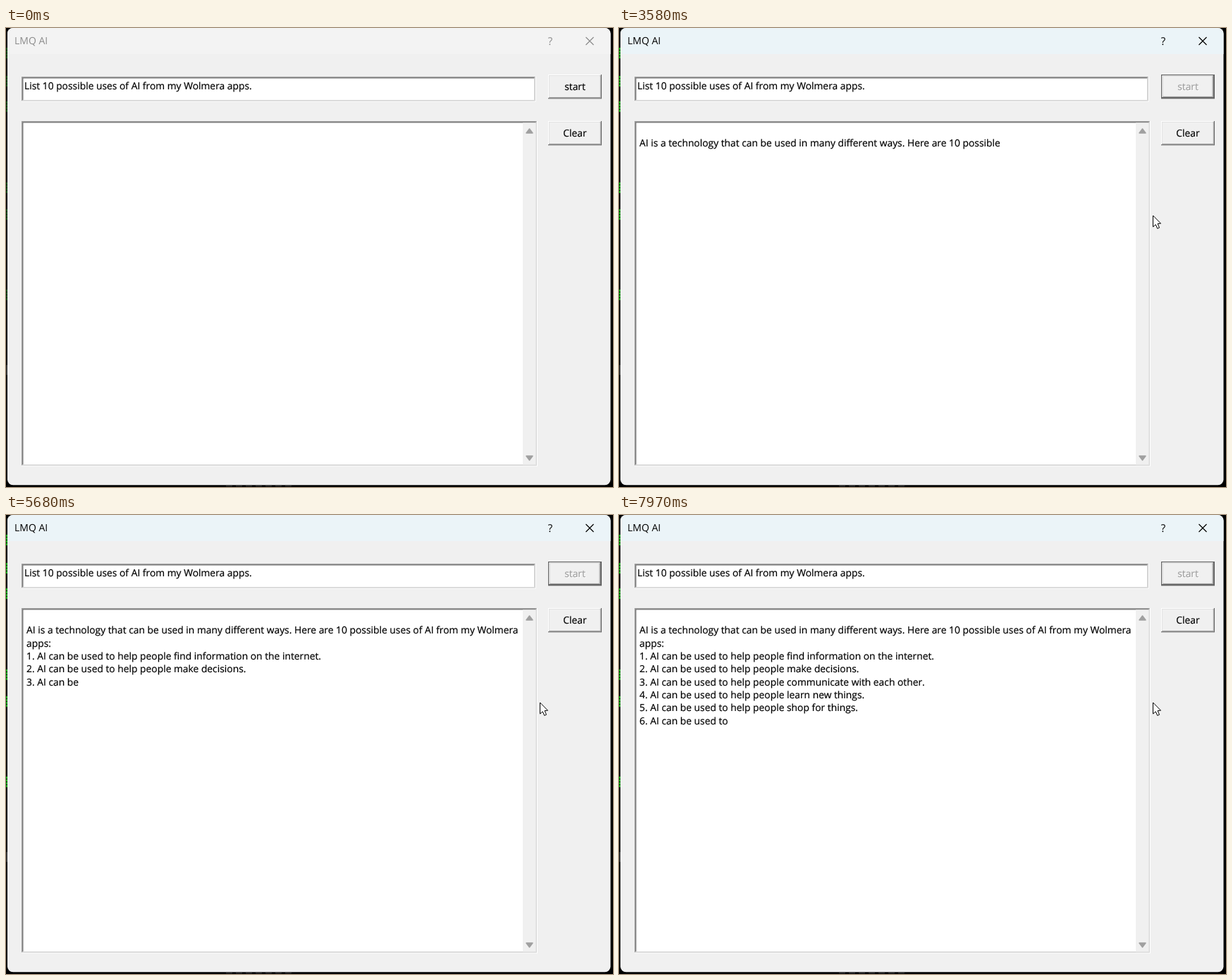
An HTML page with a canvas that plays this animation: 861x651 px, repeating every 8 s.

```html
<!DOCTYPE html>
<html lang="en">
<head>
<meta charset="utf-8">
<title>AI dialog</title>
<style>
  html, body { margin: 0; width: 100%; height: 100%; overflow: hidden; background: #000; }
  canvas { display: block; }
</style>
</head>
<body>
<canvas id="stage" width="861" height="651"></canvas>
<script>
const ctx = document.getElementById('stage').getContext('2d');
const LOOP = 8000, TICK = 78.1;
const EDGE = 1.23; // dialog pixels are shown enlarged, so edges are slightly soft
const PROMPT = 'List 10 possible uses of AI from my Wolmera apps.';
const USES = ['find information on the internet', 'make decisions', 'communicate with each other',
  'learn new things', 'shop for things', ''];
const ANSWER = 'AI is a technology that can be used in many different ways. ' +
  'Here are 10 possible uses of AI from my Wolmera\napps:' +
  USES.map((use, i) => `\n${i + 1}. AI can be used to` + (use && ` help people ${use}.`)).join('');
const TOKENS = ANSWER.match(/\napps|\n| ?\w+|[.:]/g);
// [tick, words written so far]
const PACE = [[33, 1], [43, 17], [54, 35], [70, 60], [89, 90], [99, 105]];

function rect(x, y, w, h, color) {
  ctx.fillStyle = color;
  ctx.fillRect(x, y, w, h);
}

function text(str, x, y, color = '#000', size = 13.83, align = 'left', weight = 0.2) {
  ctx.font = `${size}px "Open Sans", "Noto Sans", sans-serif`;
  ctx.textAlign = align;
  ctx.fillStyle = ctx.strokeStyle = color;
  ctx.fillText(str, x, y);
  if (weight) {
    ctx.lineWidth = weight;
    ctx.strokeText(str, x, y);
  }
}

function polygon(points, fill, stroke, width = 1) {
  ctx.beginPath();
  points.forEach(([x, y]) => ctx.lineTo(x, y));
  ctx.closePath();
  ctx.fillStyle = fill;
  ctx.fill();
  ctx.lineJoin = 'round';
  ctx.lineWidth = width;
  ctx.strokeStyle = stroke;
  ctx.stroke();
}

// Nested edges: each layer paints its bottom-right colour, then its top-left colour.
function bevel(x, y, w, h, layers, fill) {
  for (const [topLeft, bottomRight] of layers) {
    rect(x, y, w, h, bottomRight);
    rect(x, y, w - EDGE, h - EDGE, topLeft);
    x += EDGE; y += EDGE; w -= 2 * EDGE; h -= 2 * EDGE;
  }
  rect(x, y, w, h, fill);
}

const sunken = (x, y, w, h) =>
  bevel(x, y, w, h, [['#a0a0a0', '#fff'], ['#696969', '#e3e3e3']], '#fff');

function button(label, y, state) {
  const raised = [['#fff', '#696969'], ['#f0f0f0', '#a0a0a0']];
  const frame = ['#646464', '#646464'];
  const layers = {
    normal: raised,
    pressed: [frame, ['#a0a0a0', '#a0a0a0']],
    disabled: [frame, ...raised]
  }[state];
  bevel(769, y, 76, 34.4, layers, '#f0f0f0');
  if (state === 'pressed') {
    ctx.setLineDash([1, 1]);
    ctx.lineWidth = 1;
    ctx.strokeStyle = '#000';
    ctx.strokeRect(774.5, y + 5.5, 65, 24);
    ctx.setLineDash([]);
  }
  const baseline = y + 22 + (state === 'pressed');
  if (state === 'disabled') text(label, 808, baseline + 1, '#fff', 13.83, 'center');
  text(label, 807, baseline, state === 'disabled' ? '#a0a0a0' : '#000', 13.83, 'center');
}

function backdrop(bright) {
  rect(0, 0, 861, 651, '#000');
  const green = bright ? '#12a812' : '#0b4a0b';
  for (const y of [28, 68, 104, 219, 257, 371])
    for (let i = 0; i < 4; i++) rect(0, y + i * 4, 2, 3, green);
  rect(0, 478, 2, 14, '#333');
  for (let x = 312; x < 408; x += 14) rect(x, 649, 9, 1, '#3a3a3a');
}

function titleBar(tick) {
  const color = tick < 14 ? '#8c8c8c' : '#000';
  rect(2, 0, 856, 37, tick < 14 ? '#f3f3f3' : tick < 15 ? '#f2f4f4' : '#ebf4f8');
  text('LMQ AI', 12, 23, color, 14, 'left', 0);
  text('?', 772, 23.5, color, 15, 'center', 0);
  ctx.beginPath();
  ctx.moveTo(822.5, 13); ctx.lineTo(833.5, 24);
  ctx.moveTo(833.5, 13); ctx.lineTo(822.5, 24);
  ctx.lineWidth = 1.2;
  ctx.strokeStyle = color;
  ctx.stroke();
}

function scrollArrow(y, dir) {
  polygon([[738, y + 3 * dir], [747, y + 3 * dir], [742.5, y - 3 * dir]], '#a0a0a0', '#a0a0a0', 1.5);
}

function answer(tick) {
  if (tick < PACE[0][0]) return;
  const i = Math.max(1, PACE.findIndex(([at]) => at >= tick));
  const [[t0, n0], [t1, n1]] = [PACE[i - 1], PACE[i]];
  const count = Math.floor(n0 + (n1 - n0) * (tick - t0) / (t1 - t0) + 1e-6);
  TOKENS.slice(0, count).join('').split('\n').forEach((line, row) =>
    text(line, 29, Math.round(168.3 + 18.35 * row)));
}

function pointerAt(tick) {
  const mix = (x0, y0, x1, y1, p) => [x0 + (x1 - x0) * p, y0 + (y1 - y0) * p];
  if (tick <= 10) return mix(768, 548, 792, 85, 1 - (1 - tick / 10) ** 2);
  if (tick <= 16) return mix(792, 85, 797, 84, Math.min(1, (tick - 10) / 2));
  const p = Math.min(1, (tick - 16) / 6);
  return mix(797, 84, 757.5, 266, p * (2 - p));
}

function pointer(tick) {
  if (tick < 0) return;
  const [x, y] = pointerAt(tick);
  const clicking = tick === 14;
  if (clicking) {
    ctx.beginPath();
    ctx.arc(796, 84.5, 14, 0, 7);
    ctx.fillStyle = 'rgba(247,247,90,.8)';
    ctx.fill();
  }
  const shape = [[0, 0], [0, 16], [3.8, 12.8], [6.2, 18.4], [9, 17.2], [6.6, 11.6], [11, 11.2]];
  polygon(shape.map(([dx, dy]) => [x + dx, y + dy]), clicking ? '#ffffc8' : '#fff', clicking ? '#3c3c10' : '#000');
}

function draw(time) {
  const tick = Math.floor((time % LOOP - 230) / TICK + 0.25);
  ctx.textRendering = 'geometricPrecision';
  backdrop(tick >= 14);
  ctx.save();
  ctx.beginPath();
  ctx.roundRect(2, 0, 855.5, 648.3, 8);
  ctx.clip();
  rect(2, 0, 856, 649, '#f0f0f0');
  titleBar(tick);
  sunken(22, 69, 729.8, 35.6);
  text(PROMPT, 26, 87);
  sunken(22, 132, 732, 489.6);
  rect(733, 134.4, 18.6, 485, '#f0f0f0');
  scrollArrow(146, 1);
  scrollArrow(610, -1);
  button('start', 66, tick < 14 ? 'normal' : tick < 15 ? 'pressed' : 'disabled');
  button('Clear', 132, 'normal');
  answer(tick);
  pointer(tick);
  ctx.restore();
}

const start = performance.now();
function loop() {
  draw(performance.now() - start);
  requestAnimationFrame(loop);
}
loop();
</script>
</body>
</html>
```
